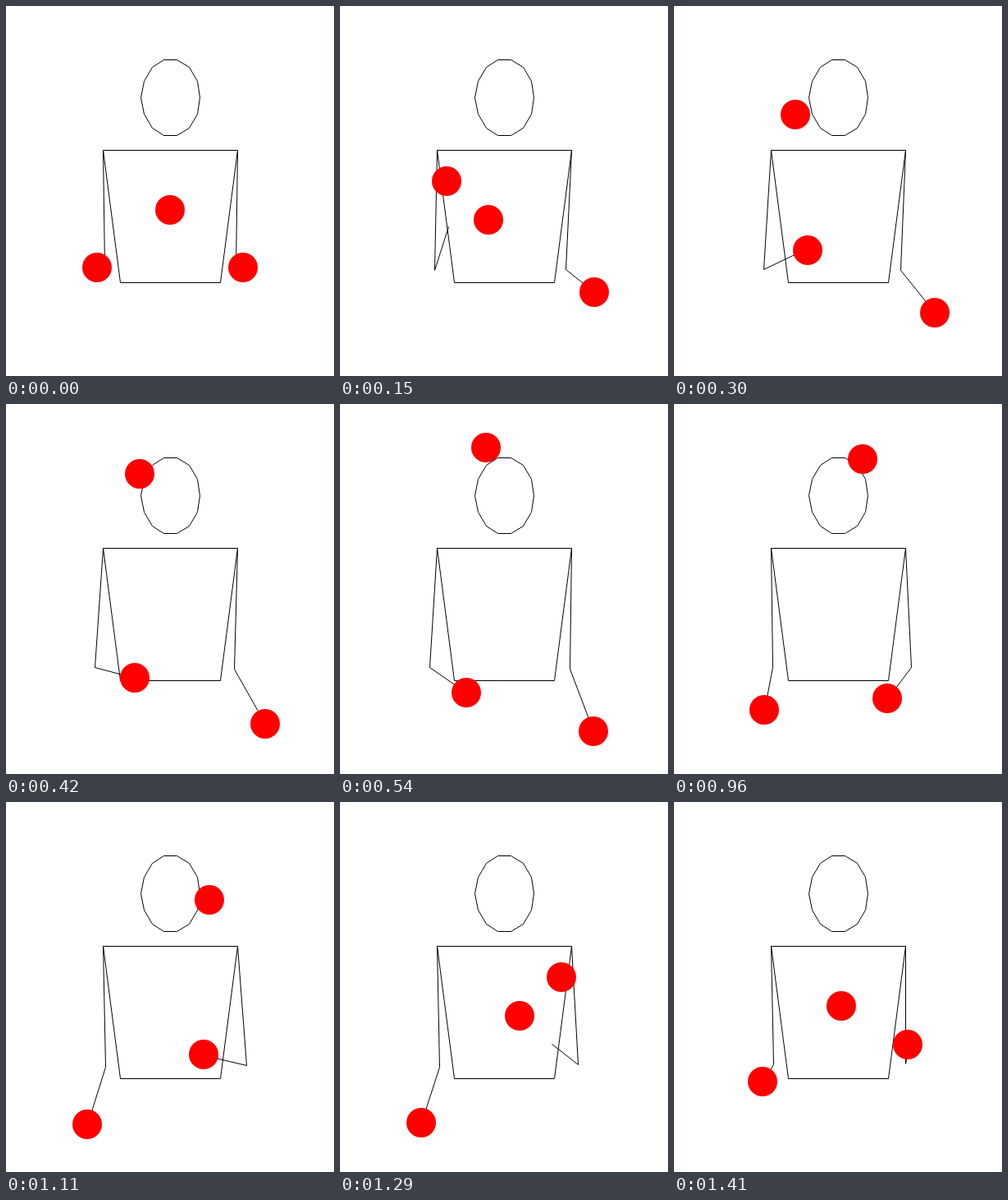
These frames come from a looping animation (400 by 450 pixels, 1440 ms). An HTML page with a canvas:

```html
<!DOCTYPE html>
<html lang="en">
<head>
<meta charset="utf-8">
<title>Shower juggling</title>
<style>
  html, body { margin: 0; width: 100%; height: 100%; overflow: hidden; background: #fff; }
  canvas { display: block; }
</style>
</head>
<body>
<canvas id="stage" width="400" height="450"></canvas>
<script>
const ctx = document.getElementById('stage').getContext('2d');
const LOOP = 1440, STEP = 30, LOW_HALF = 360;
const BASE = 318.3;                  // height of every throw and catch
const DRIFT = 178 / LOOP;            // sideways speed of every throw, px per ms
const HIGH_RISE = 282.6, LOW_RISE = 70.5;
const HIGH_SPEED = 4 * HIGH_RISE / LOOP;
const LOW_SPEED = 2 * LOW_RISE / LOW_HALF;
const UPPER_ARM = 147.5, FOREARM = 144.1, REACH = 107;
const SHOULDER_Y = 175.4;

// Hand keys: time, x, y, velocity x, velocity y
const LEFT = [
  [0, 111, BASE, DRIFT, -HIGH_SPEED],
  [360, 155.5, BASE, 0.0515, 0.28],
  [960, 110, 372, -0.1, 0.1],
  [LOOP, 111, BASE, DRIFT, -HIGH_SPEED]
];
const RIGHT = [
  [0, 289, BASE, 0.19, 0.2],
  [1080, 244.5, BASE, -DRIFT, -LOW_SPEED],
  [LOOP, 289, BASE, 0.19, 0.2]
];

function hermite(p, q, vp, vq, span, u) {
  const w = 1 - u;
  return p * w * w * (1 + 2 * u) + q * u * u * (3 - 2 * u) +
    span * u * w * (vp * w - vq * u);
}

function handAt(keys, t) {
  const i = keys.findIndex(k => k[0] > t);
  const a = keys[i - 1], b = keys[i], span = b[0] - a[0], u = (t - a[0]) / span;
  return [1, 2].map(k => hermite(a[k], b[k], a[k + 2], b[k + 2], span, u));
}

function highThrow(t) {
  const u = t / LOOP;
  return [111 + DRIFT * t, BASE - 4 * HIGH_RISE * u * (1 - u)];
}

function lowThrow(t) {
  const w = t <= LOW_HALF ? t : t - LOOP;
  return [200 - DRIFT * w, BASE - LOW_RISE * (1 - (w / LOW_HALF) ** 2)];
}

// The hand reaches forward by a fixed depth; the elbow hangs in the vertical plane through it.
function elbowFor(shoulderX, [x, y]) {
  const dx = x - shoulderX, down = y - SHOULDER_Y;
  const out = Math.hypot(dx, REACH), dist = Math.hypot(out, down);
  const along = (dist ** 2 + UPPER_ARM ** 2 - FOREARM ** 2) / (2 * dist);
  const sag = Math.sqrt(Math.max(0, UPPER_ARM ** 2 - along ** 2));
  const forward = (along * out - sag * down) / dist;
  return [shoulderX + dx * forward / out, SHOULDER_Y + (along * down + sag * out) / dist];
}

// Smooth one-pixel line through whole pixel centres
function polyline(points) {
  ctx.beginPath();
  for (const [x, y] of points) ctx.lineTo(Math.round(x) + 0.5, Math.round(y) + 0.5);
  ctx.stroke();
}

const HEAD_SIDES = 14;
const head = Array.from({ length: HEAD_SIDES + 1 }, (_, i) => {
  const a = i * 2 * Math.PI / HEAD_SIDES;
  return [200.3 + 36 * Math.cos(a), 111 + 47 * Math.sin(a)];
});
const torso = [[118, 175], [282, 175], [261, 336], [139, 336], [118, 175]];

function arm(shoulderX, hand) {
  polyline([[Math.floor(shoulderX), 175], elbowFor(shoulderX, hand), hand]);
}

function ball([x, y]) {
  ctx.beginPath();
  ctx.arc(Math.round(x), Math.round(y), 18, 0, 2 * Math.PI);
  ctx.fill();
}

function draw(t) {
  const left = handAt(LEFT, t), right = handAt(RIGHT, t);
  ctx.fillStyle = '#fff';
  ctx.fillRect(0, 0, 400, 450);
  ctx.strokeStyle = '#000';
  ctx.lineWidth = 1;
  polyline(head);
  polyline(torso);
  arm(118, left);
  arm(282.5, right);
  ctx.fillStyle = '#f00';
  ball(highThrow(t));
  if (t <= LOW_HALF || t >= LOOP - LOW_HALF) ball(lowThrow(t));
  if (t > LOW_HALF) ball(left);
  if (t < LOOP - LOW_HALF) ball(right);
}

const start = performance.now();
function tick() {
  const elapsed = (performance.now() - start) % LOOP;
  draw(Math.floor(elapsed / STEP) * STEP);
  requestAnimationFrame(tick);
}
tick();
</script>
</body>
</html>
```
